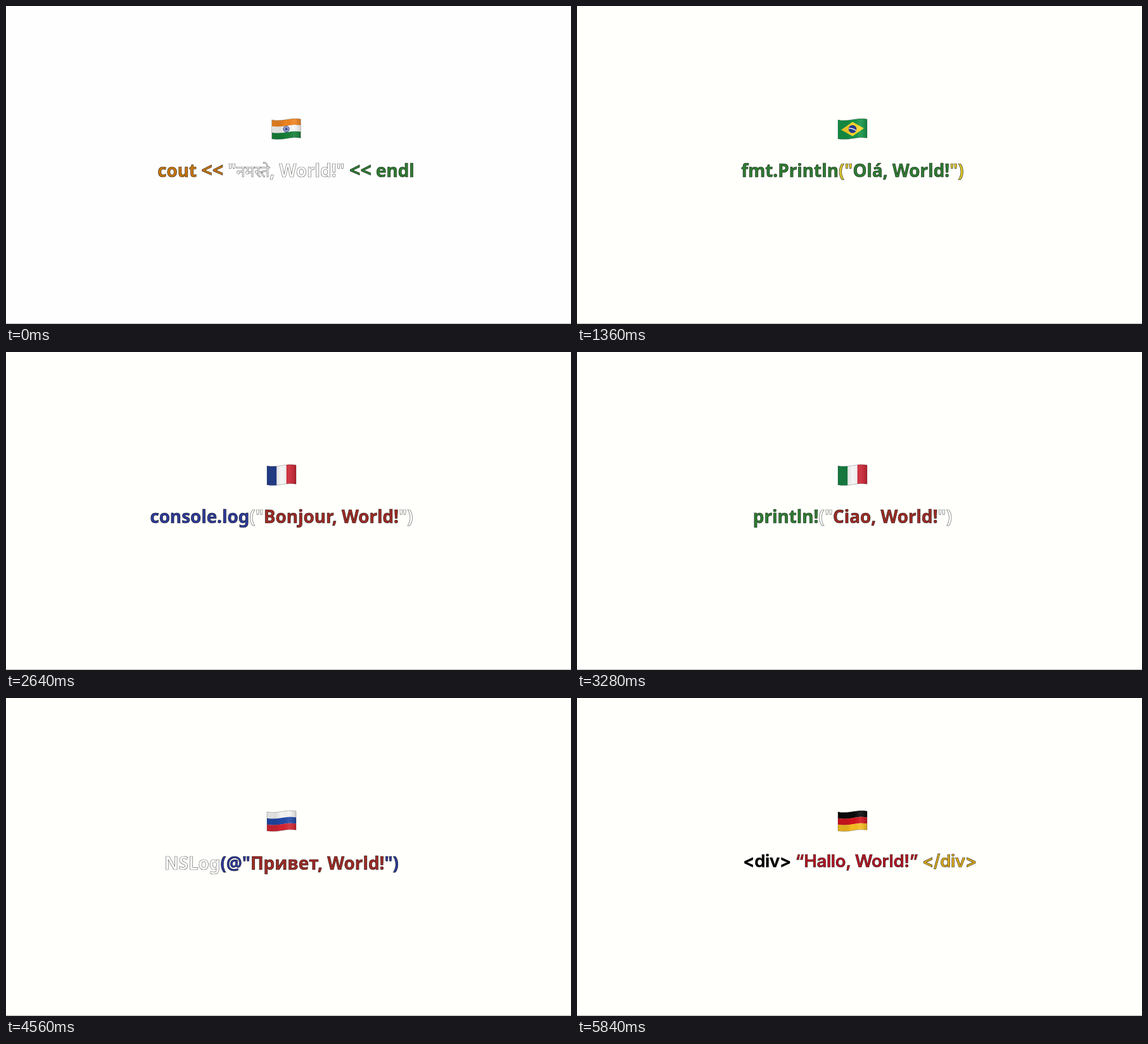
These frames come from a looping animation (892 by 502 pixels, 6.48 s). An HTML page:

```html
<!DOCTYPE html>
<html lang="en">
<head>
<meta charset="utf-8">
<title>Hello, World</title>
<style>
  html, body { margin: 0; width: 100%; height: 100%; overflow: hidden; background: #fffffc; }
  svg { display: block; width: 100vw; height: 100vh; }
  text {
    font: 700 27.8px "Noto Sans", "Noto Sans Devanagari", "Noto Sans CJK SC", "Noto Sans CJK JP", sans-serif;
    text-anchor: middle;
    white-space: pre;
    stroke: rgba(0, 0, 0, .75);
    stroke-width: .7px;
  }
  text.inter { font: 600 27.6px Inter, sans-serif; letter-spacing: -.35px; }
  .hollow { fill: #fffffd; stroke: #707070; }
  .cjk { font-size: 30.5px; }
  .kana { font-size: 29px; }
  .deva { font-size: 25px; font-weight: 400; }
  .operator { font-size: 30.5px; }
</style>
</head>
<body>
<svg id="stage" viewBox="0 0 892 502" xmlns="http://www.w3.org/2000/svg"></svg>
<script>
const LOOP = 6480, FIRST = 720, STEP = 640;
const C = {
  orange: '#c8760e', green: '#2e7d32', blue: '#2d3b98', red: '#9e2b25',
  yellow: '#e0cb2c', black: '#000', crimson: '#b71524', gold: '#dcac1e', white: '#fff'
};

// Flag cloth: 46 wide, 30 high, with a shallow wave along the top and bottom edges.
const band = (y, h, fill) => {
  const p = (x, v) => `${x},${v}`;
  const b = y + h;
  return `<path fill="${fill}" d="M${p(0, y + 2.6)}C${p(7, y + 4)} ${p(15, y + 3.7)} ${p(23, y + 2.2)}` +
    `C${p(31, y + .7)} ${p(39, y)} ${p(46, y + 1.4)}L${p(46, b + 1.4)}` +
    `C${p(39, b)} ${p(31, b + .7)} ${p(23, b + 2.2)}C${p(15, b + 3.7)} ${p(7, b + 4)} ${p(0, b + 2.6)}Z"/>`;
};
const rows = (...fills) => fills.map((f, i) => band(i * 30 / fills.length, 30 / fills.length + .1, f)).join('');
const cols = (...fills) => fills.map((f, i) =>
  `<rect x="${i * 46 / 3}" width="15.5" height="36" fill="${f}"/>`).join('');
const disc = (x, y, r, fill, extra = '') => `<circle cx="${x}" cy="${y}" r="${r}" fill="${fill}" ${extra}/>`;
const line = (d, color, width) => `<path d="${d}" stroke="${color}" stroke-width="${width}" fill="none"/>`;
const star = (x, y, r) => {
  const pts = Array.from({ length: 10 }, (_, i) => {
    const a = i * Math.PI / 5 - Math.PI / 2, q = i % 2 ? r * .4 : r;
    return `${(x + q * Math.cos(a)).toFixed(2)},${(y + q * Math.sin(a)).toFixed(2)}`;
  });
  return `<polygon fill="#ffdc1e" points="${pts.join(' ')}"/>`;
};

const wheel = () => {
  const spokes = Array.from({ length: 12 }, (_, i) =>
    `<path d="M23 12.7V21.7" transform="rotate(${i * 30} 23 17.2)"/>`).join('');
  return disc(23, 17.2, 4.6, 'none', 'stroke="#26378c" stroke-width="1"') +
    `<g stroke="#26378c" stroke-width=".4">${spokes}</g>` + disc(23, 17.2, 1.2, '#26378c');
};
const union = () => {
  const diagonals = 'M0 3L46 31M0 32L46 2';
  return band(0, 30, '#20357f') + line(diagonals, '#f4f4f4', 5.5) + line(diagonals, '#c8202f', 1.8) +
    line('M23 0V36', '#f4f4f4', 9) + band(10.5, 9, '#f4f4f4') +
    line('M23 0V36', '#c8202f', 5.4) + band(12.3, 5.4, '#c8202f');
};

const flags = {
  india: () => rows('#ee8420', '#f6f6f6', '#16803a') + wheel(),
  uk: union,
  brazil: () => band(0, 30, '#159447') + '<path d="M5 18.5L23 6L41 16L23 28.5Z" fill="#fbd52c"/>' +
    disc(23, 17.2, 6.3, '#263c8e') + line('M17 16.2Q23 15.2 28.7 19.7', '#fff', 1.2),
  china: () => band(0, 30, '#d01c2a') + star(7.3, 12, 4.8) +
    star(14.5, 7.2, 1.7) + star(18.3, 10.3, 1.7) + star(18.4, 15, 1.7) + star(14.8, 18.6, 1.7),
  france: () => cols('#24408f', '#f6f6f6', '#cb2332'),
  italy: () => cols('#178344', '#f6f6f6', '#cb2332'),
  japan: () => band(0, 30, '#f4f4f4') + disc(23, 17.2, 8.7, '#cb2332'),
  russia: () => rows('#f4f4f4', '#2148a4', '#d32431'),
  spain: () => band(0, 30, '#c42130') + band(7.5, 15, '#fcc81f') +
    '<path d="M8.5 14h7v8h-7z" fill="#a8482a"/><path d="M6.5 15v8M17.5 15v8" stroke="#8d5b30" stroke-width="1.2"/>' +
    '<path d="M9.5 11.5h5v2h-5z" fill="#7d3824"/><path d="M12 14v8M8.5 18h7" stroke="#d9a53a" stroke-width=".8"/>',
  germany: () => rows('#0a0a0a', '#d2141f', '#f6bd20')
};

// flag, text parts as [text, colour, class], then optional placement
const slides = [
  ['india', [['cout ', 'orange'], ['<<', 'orange', 'operator'], [' "', 'white'], ['नमस्ते', 'white', 'deva'],
    [', World!" ', 'white'], ['<<', 'green', 'operator'], [' endl', 'green']],
    { x: 442, flagX: 419.5, paper: '#fefefe' }],
  ['uk', [['print', 'blue'], ['("', 'white'], ['Hello, World!', 'red'], ['")', 'white']]],
  ['brazil', [['fmt.Println', 'green'], ['("', 'yellow'], ['Olá, World!', 'green'], ['")', 'yellow']]],
  ['china', [['puts ', 'yellow'], ['"', 'red'], ['你好', 'red', 'cjk'], [', World!"', 'red']]],
  ['france', [['console.log', 'blue'], ['("', 'white'], ['Bonjour, World!', 'red'], ['")', 'white']]],
  ['italy', [['println!', 'green'], ['("', 'white'], ['Ciao, World!', 'red'], ['")', 'white']]],
  ['japan', [['echo "', 'white'], ['こんにちは', 'red', 'kana'], [', World!', 'red'], ['"', 'white']]],
  ['russia', [['NSLog', 'white'], ['(@"', 'blue'], ['Привет, World!', 'red'], ['")', 'blue']], { y: 271 }],
  ['spain', [['System', 'red'], ['.out.println("', 'yellow'], ['Hola, World!', 'red'], ['")', 'yellow']]],
  ['germany', [['<div> ', 'black'], ['“Hallo, World!”', 'crimson'], [' </div>', 'gold']],
    { x: 446.5, y: 267, font: 'inter' }]
];

const escapeText = s => s.replace(/&/g, '&amp;').replace(/</g, '&lt;');
const part = ([text, color, cls = '']) =>
  `<tspan fill="${C[color]}" class="${cls} ${color === 'white' ? 'hollow' : ''}">${escapeText(text)}</tspan>`;

const slide = ([flag, parts, { x = 435, y = 270, flagX = 412, paper = '#fffffc', font = '' } = {}]) => `
  <g class="slide" visibility="hidden">
    <rect width="892" height="502" fill="${paper}"/>
    <g transform="translate(${flagX} 177.1)">
      <g clip-path="url(#cloth)">${flags[flag]()}${band(0, 30, 'url(#sheen)')}</g>
      <g fill-opacity="0" stroke="#000" stroke-opacity=".3" stroke-width=".8">${band(0, 30, '#000')}</g>
    </g>
    <text x="${x}" y="${y}" class="${font}">${parts.map(part).join('')}</text>
  </g>`;

const stage = document.getElementById('stage');
stage.innerHTML = `
  <defs>
    <clipPath id="cloth">${band(0, 30, '#000')}</clipPath>
    <linearGradient id="sheen">
      <stop offset="0" stop-opacity=".08"/>
      <stop offset=".3" stop-opacity=".1"/>
      <stop offset=".5" stop-opacity="0"/>
      <stop offset=".75" stop-color="#fff" stop-opacity=".1"/>
      <stop offset="1" stop-opacity=".16"/>
    </linearGradient>
  </defs>
  ${slides.map(slide).join('')}
  <rect y="501" width="892" height="1" fill="#b2b2ae"/>`;

const groups = [...stage.querySelectorAll('.slide')];
const start = performance.now();
function draw() {
  const t = (performance.now() - start) % LOOP;
  const current = t < FIRST ? 0 : 1 + Math.floor((t - FIRST) / STEP);
  groups.forEach((g, i) => g.setAttribute('visibility', i === current ? 'visible' : 'hidden'));
  requestAnimationFrame(draw);
}
draw();
</script>
</body>
</html>
```
